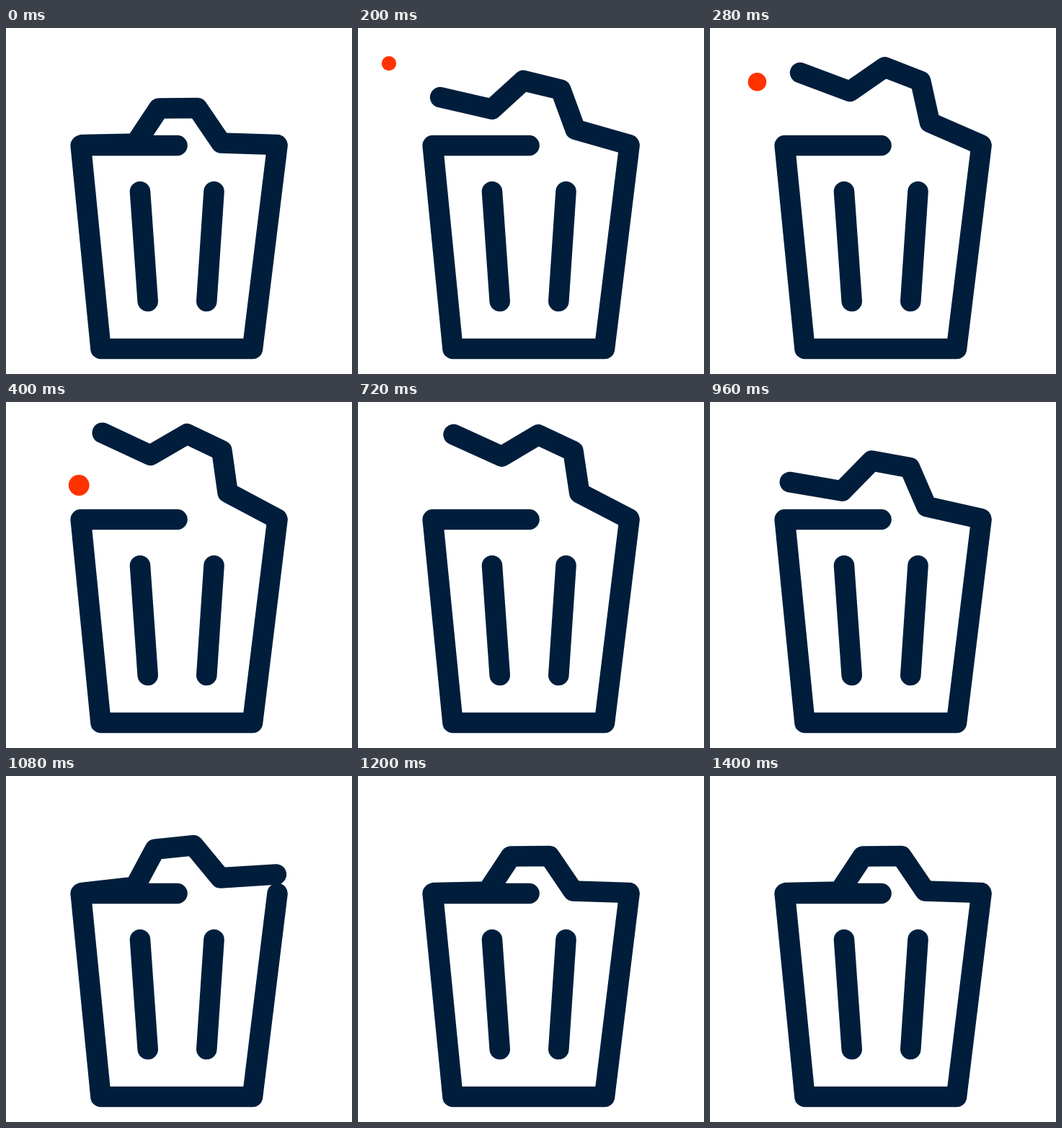
An HTML page that plays this animation: 480 by 480 pixels, repeating every 2 s.

```html
<!DOCTYPE html>
<html lang="en">
<head>
<meta charset="utf-8">
<title>Trash can</title>
<style>
  html, body { margin: 0; height: 100%; overflow: hidden; background: #fff; }
  svg { display: block; width: 100%; height: 100%; }
  path { fill: none; stroke: #001e3c; stroke-width: 28.6; stroke-linecap: round; stroke-linejoin: round; }
</style>
</head>
<body>
<svg viewBox="0 0 480 480">
  <circle id="ball" fill="#ff3300"/>
  <path d="M237.5 163H103.7L131.5 445H342L376.5 163M186 227L196.7 379M288.5 227L278.3 379"/>
  <path id="lid" d="M106 162L179.5 160.5 212 111.5 265.5 111 298.5 159.5 376 162"/>
</svg>
<script>
  const LOOP = 2000, STEP = 40, OPEN = 26.2;
  const ball = document.getElementById('ball');
  const lid = document.getElementById('lid');

  const progress = (t, from, to) => Math.min(1, Math.max(0, (t - from) / (to - from)));
  const smooth = u => u * u * (3 - 2 * u);
  const hop = u => 4 * u * (1 - u);

  // Opens and shuts on the right hinge, then rocks on the left end and settles.
  function lidTransform(t) {
    const swing = t < 640
      ? OPEN * smooth(progress(t, 0, 380))
      : OPEN * (1 - progress(t, 640, 1040) ** 2.4);
    const rock = 7.2 * hop(progress(t, 1040, 1200));
    const settle = 2.5 * hop(progress(t, 1200, 1400));
    return `rotate(${swing + settle} 376 162) rotate(${-rock} 106 162)`;
  }

  function draw(t) {
    const move = smooth(progress(t, 0, 640));
    ball.setAttribute('cx', 13 + 129 * move);
    ball.setAttribute('cy', 15 + 147 * move);
    ball.setAttribute('r', t < 640 ? 14.4 * Math.sin(Math.PI / 2 * progress(t, 0, 400)) : 0);
    lid.setAttribute('transform', lidTransform(t));
  }

  const start = performance.now();
  function tick() {
    const t = (performance.now() - start) % LOOP;
    draw(Math.floor(t / STEP) * STEP);
    requestAnimationFrame(tick);
  }
  tick();
</script>
</body>
</html>
```
